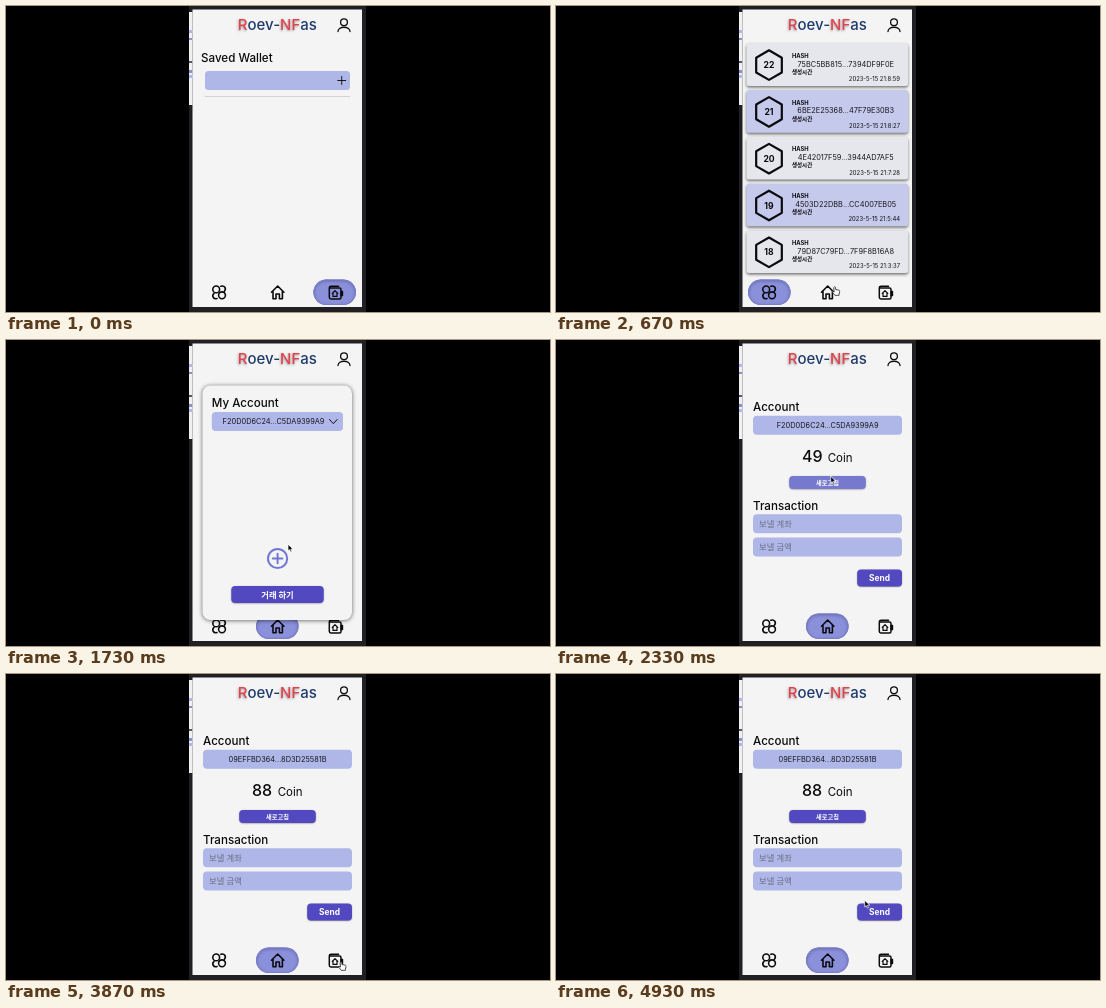
An HTML page with a canvas that plays this animation: 544 by 306 pixels, repeating every 4990 ms.

```html
<!DOCTYPE html>
<html lang="ko">
<head>
<meta charset="utf-8">
<title>Wallet app</title>
<style>
html, body { margin: 0; width: 100%; height: 100%; overflow: hidden; background: #000; }
canvas { display: block; width: 544px; height: 306px; }
</style>
</head>
<body>
<canvas id="stage"></canvas>
<script>
const LOOP = 4990, STEP = LOOP / 75;
const FONT = 'Inter, "Noto Sans CJK KR", "Noto Sans CJK", sans-serif';
const FIELD = '#aeb7e8', BUTTON = '#5249c0', HOVER = '#7779cf', PAPER = '#f4f4f4', INK = '#0b0b0d';

const canvas = document.getElementById('stage');
const ctx = canvas.getContext('2d');
const ratio = window.devicePixelRatio || 1;
canvas.width = 544 * ratio;
canvas.height = 306 * ratio;

const accounts = [
  '09EFFBD364...8D3D25581B',
  '016C3C483B...A53EB7682A',
  'F20D0D6C24...C5DA9399A9',
  '9A75B25F4F...28042B14BF',
  '5A5F4CEF9B...D3B7E1DC75'
];
const blocks = [
  [22, '75BC5BB815...7394DF9F0E', '21:8:59'],
  [21, '6BE2E25368...47F79E30B3', '21:8:27'],
  [20, '4E42017F59...3944AD7AF5', '21:7:28'],
  [19, '4503D22DBB...CC4007EB05', '21:5:44'],
  [18, '79D87C79FD...7F9F8B16A8', '21:3:37']
];

// start time, page, chosen account, list open
const scenes = [
  [0, 'wallet', 0, false],
  [330, 'blocks', 0, false],
  [795, 'home', 0, false],
  [1330, 'home', 0, true],
  [1595, 'home', 2, false],
  [1925, 'account', 2, false],
  [2592, 'home', 0, false],
  [2858, 'home', 0, true],
  [3325, 'account', 0, false],
  [3922, 'wallet', 0, false],
  [4388, 'home', 0, false],
  [4720, 'account', 0, false]
];

// time, x, y of the pointer tip
const path = [
  [130, 290, 303], [300, 214, 286], [470, 214, 286], [660, 278.5, 280.5],
  [735, 278.5, 280.5], [1130, 337.7, 62.5], [1290, 327, 80], [1340, 327, 80],
  [1530, 290, 150], [1600, 290, 150], [1850, 275, 253], [1930, 275, 253],
  [2320, 274.7, 136.5], [2400, 274.7, 136.5], [2560, 273, 284], [2610, 273, 284],
  [2800, 326, 80], [2870, 326, 80], [3127, 279.7, 232.5], [3240, 277, 253],
  [3350, 277, 253], [3850, 334.8, 287.5], [4080, 334.8, 287.5], [4320, 273, 285],
  [4400, 273, 285], [4560, 271, 251], [4680, 271, 251], [4923, 308.7, 226.5]
];

function pointerAt(t) {
  if (t < path[0][0]) return null;
  const i = path.findIndex(p => p[0] > t);
  if (i < 0) return path[path.length - 1].slice(1);
  const [t0, x0, y0] = path[i - 1], [t1, x1, y1] = path[i];
  const u = (t - t0) / (t1 - t0), e = u * u * (3 - 2 * u);
  return [x0 + (x1 - x0) * e, y0 + (y1 - y0) * e];
}

function rect(x, y, w, h, color) {
  ctx.fillStyle = color;
  ctx.fillRect(x, y, w, h);
}

function box(x, y, w, h, r, color, blur = 0, dy = 0, shade = 'rgba(0,0,0,.4)') {
  ctx.save();
  ctx.shadowColor = blur ? shade : 'transparent';
  ctx.shadowBlur = blur * ratio;
  ctx.shadowOffsetY = dy * ratio;
  ctx.fillStyle = color;
  ctx.beginPath();
  ctx.roundRect(x, y, w, h, r);
  ctx.fill();
  ctx.restore();
}

// y is the middle of the capitals
function text(s, x, y, size, { weight = 400, color = INK, align = 'left' } = {}) {
  ctx.font = `${weight} ${size}px ${FONT}`;
  ctx.textAlign = align;
  ctx.fillStyle = color;
  ctx.fillText(s, x, y + size * 0.364);
  return ctx.measureText(s).width;
}

function stroke(d, width, color = INK, fill) {
  const p = new Path2D(d);
  if (fill) { ctx.fillStyle = fill; ctx.fill(p); }
  ctx.lineWidth = width;
  ctx.strokeStyle = color;
  ctx.lineCap = ctx.lineJoin = 'round';
  ctx.stroke(p);
}

function ring(x, y, r, width, color = INK) {
  ctx.beginPath();
  ctx.arc(x, y, r, 0, 7);
  ctx.lineWidth = width;
  ctx.strokeStyle = color;
  ctx.stroke();
}

function title() {
  let x = 231.8;
  for (const [s, red] of [['R', 1], ['oev-', 0], ['NF', 1], ['as', 0]]) {
    ctx.save();
    if (red) {
      ctx.shadowColor = 'rgba(70,70,90,.55)';
      ctx.shadowBlur = 2.5 * ratio;
      ctx.shadowOffsetX = -0.6 * ratio;
      ctx.shadowOffsetY = 1.2 * ratio;
    }
    x += text(s, x, 18.7, 15, { weight: 500, color: red ? '#e0444b' : '#1f3b6c' });
    ctx.restore();
  }
}

function frame() {
  rect(0, 0, 544, 306, '#000');
  rect(183, 0, 177, 306, '#202024');
  rect(183, 6, 3.5, 93, '#f0f0f2');
  rect(183, 24, 3.5, 3, FIELD);
  rect(183, 32, 3.5, 2, '#8890c8');
  rect(183, 55, 3.5, 2, '#55576a');
  rect(183, 64, 3.5, 3, '#8890c8');
  rect(183, 69, 3.5, 3, FIELD);
  rect(186.5, 3.5, 169.5, 297.5, PAPER);
  title();
  ring(338, 16.3, 3.4, 1.3);
  stroke('M332 25.6 C332 19.8 344 19.8 344 25.6', 1.3);
}

function nav(page) {
  const slot = { blocks: 0, home: 1, account: 1, wallet: 2 }[page];
  const x = [192, 250, 307.4][slot];
  box(x, 273.5, 42.6, 25.5, 12.7, '#8b90da');
  ctx.save();
  ctx.beginPath();
  ctx.roundRect(x, 273.5, 42.6, 25.5, 12.7);
  ctx.clip();
  ctx.shadowColor = 'rgba(40,40,100,.75)';
  ctx.shadowBlur = 3 * ratio;
  ctx.shadowOffsetY = ratio;
  ctx.lineWidth = 1;
  ctx.strokeStyle = '#777bc6';
  ctx.stroke();
  ctx.restore();

  ring(210.2, 283.4, 3.4, 1.6);
  ring(216, 289.3, 3.4, 1.6);
  stroke('M214.8 280.3 C218.5 279 220.6 282.5 218.4 285.2 M208 287.4 C205.4 289.8 207.4 293.6 211 292.5', 1.6);

  stroke('M265.5 286.2 L271.7 280 L277.9 286.2 M267 285 V292.8 H270 V288 H273.4 V292.8 H276.4 V285', 1.6);

  stroke('M324.5 282 H333.5 Q335 282 335 283.5 V291.5 Q335 293 333.5 293 H325 Q323.3 293 323.3 291.3 V281.8 Q323.3 280.2 325 280.2 H332.5', 1.5);
  stroke('M335 285.4 H336.6 V289.6 H335 Z', 1.2, INK, INK);
  stroke('M326.2 287.4 L329 284.7 L331.8 287.4 M327 287 V290.4 H331 V287', 1.2);
}

function button(label, x, y, w, h, size, mouse) {
  const hot = mouse && mouse[0] > x && mouse[0] < x + w && mouse[1] > y && mouse[1] < y + h;
  box(x, y, w, h, 4, hot ? HOVER : BUTTON, 1.5, 0.5);
  text(label, x + w / 2, y + h / 2, size, { weight: 700, color: '#fff', align: 'center' });
}

function hash(s, x, y) {
  text(s, x, y, 7.4, { color: '#17171c', align: 'center' });
}

const pages = {
  wallet() {
    text('Saved Wallet', 195, 51.3, 11.6, { weight: 500 });
    box(199, 65, 145, 19, 3.5, FIELD);
    stroke('M331.7 74.5 H339.7 M335.7 70.5 V78.5', 0.9);
    rect(199, 90, 145, 0.8, '#cacaca');
  },

  blocks() {
    blocks.forEach(([n, h, time], i) => {
      const y = 37.3 + i * 46.8;
      box(190.5, y, 161.5, 42.6, 2.5, i % 2 ? '#c5c9ec' : '#e6e6ed', 3, 1.5, 'rgba(0,0,0,.55)');
      const cx = 213, cy = y + 21.8;
      ctx.beginPath();
      for (let k = 0; k < 6; k++) {
        const a = Math.PI * (k / 3 + 0.5);
        ctx.lineTo(cx + 14.8 * Math.cos(a), cy + 14.8 * Math.sin(a));
      }
      ctx.closePath();
      ctx.lineWidth = 2.2;
      ctx.strokeStyle = INK;
      ctx.stroke();
      text(n, cx, cy, 8.6, { weight: 700, align: 'center' });
      text('HASH', 236, y + 12.4, 5.8, { weight: 700 });
      hash(h, 289.7, y + 20.6);
      text('생성시간', 236, y + 28.4, 5.5, { weight: 700 });
      text('2023-5-15 ' + time, 344, y + 35.6, 5.9, { align: 'right' });
    });
  },

  home(pick, open, mouse) {
    box(196.5, 45.5, 149.5, 234.5, 8, PAPER, 4, 0.5, 'rgba(0,0,0,.6)');
    text('My Account', 205.8, 62.5, 11.6, { weight: 500 });
    box(205.8, 72, 131.2, 19, 4, FIELD);
    hash(accounts[pick], 267.5, 81.8);
    stroke(open ? 'M323.5 83.7 L327.3 79.5 L331.1 83.7' : 'M323.5 79.5 L327.3 83.7 L331.1 79.5', 1);
    if (open) {
      ctx.save();
      ctx.beginPath();
      ctx.rect(200, 92, 142, 107);
      ctx.clip();
      accounts.forEach((a, i) => {
        const y = 95.2 + i * 23.45;
        box(205.8, y, 131.2, 19, 4, FIELD);
        hash(a, 271.6, y + 9.7);
      });
      ctx.restore();
    }
    ring(271.6, 218.5, 9.6, 2, '#7377d4');
    stroke('M266.8 218.5 H276.4 M271.6 213.7 V223.3', 2, '#7377d4');
    button('거래 하기', 225.3, 246, 92.4, 17, 8.3, mouse);
  },

  account(pick, open, mouse) {
    text('Account', 197, 66.3, 11.6, { weight: 500 });
    box(197, 75.8, 149, 19, 4, FIELD);
    hash(accounts[pick], 271.6, 85.5);
    text(pick ? '49' : '88', 246, 116, 16, { weight: 500 });
    text('Coin', 271.7, 117.8, 11.5);
    button('새로고침', 233.2, 136, 76.6, 13, 6.2, mouse);
    text('Transaction', 197, 165.3, 11.6, { weight: 500 });
    ['보낼 계좌', '보낼 금액'].forEach((s, i) => {
      const y = 174.2 + i * 23.4;
      box(197, y, 149, 19, 4, FIELD);
      text(s, 203, y + 9.4, 8.3, { color: '#6c6f83' });
    });
    button('Send', 301.2, 229.5, 44.8, 17, 8.4, mouse);
  }
};

function pointer([x, y]) {
  ctx.save();
  ctx.translate(x, y);
  if (y > 279) {
    stroke('M-.6 .8 Q.3 -.4 1.1 .8 V3 L4.6 3.7 Q5.3 4 5.2 5 L4.6 7.6 V8.8 H.4 L-2.2 5.6 Q-2 4.3 -.6 5.2 Z', 0.8, '#222', '#fff');
  } else {
    stroke('M0 0 V6.4 L1.5 5.1 L2.6 7.6 L3.8 7.1 L2.7 4.7 H4.7 Z', 0.7, '#fff', '#000');
  }
  ctx.restore();
}

function draw(now) {
  const t = Math.floor((now % LOOP + 3) / STEP) % 75 * STEP;
  const [, page, pick, open] = scenes.filter(s => s[0] <= t + 1).pop();
  const mouse = pointerAt(t);
  ctx.setTransform(ratio, 0, 0, ratio, 0, 0);
  frame();
  nav(page);
  pages[page](pick, open, mouse);
  if (mouse) pointer(mouse);
}

const start = performance.now();
function tick() {
  draw(performance.now() - start);
  requestAnimationFrame(tick);
}
tick();
</script>
</body>
</html>
```
